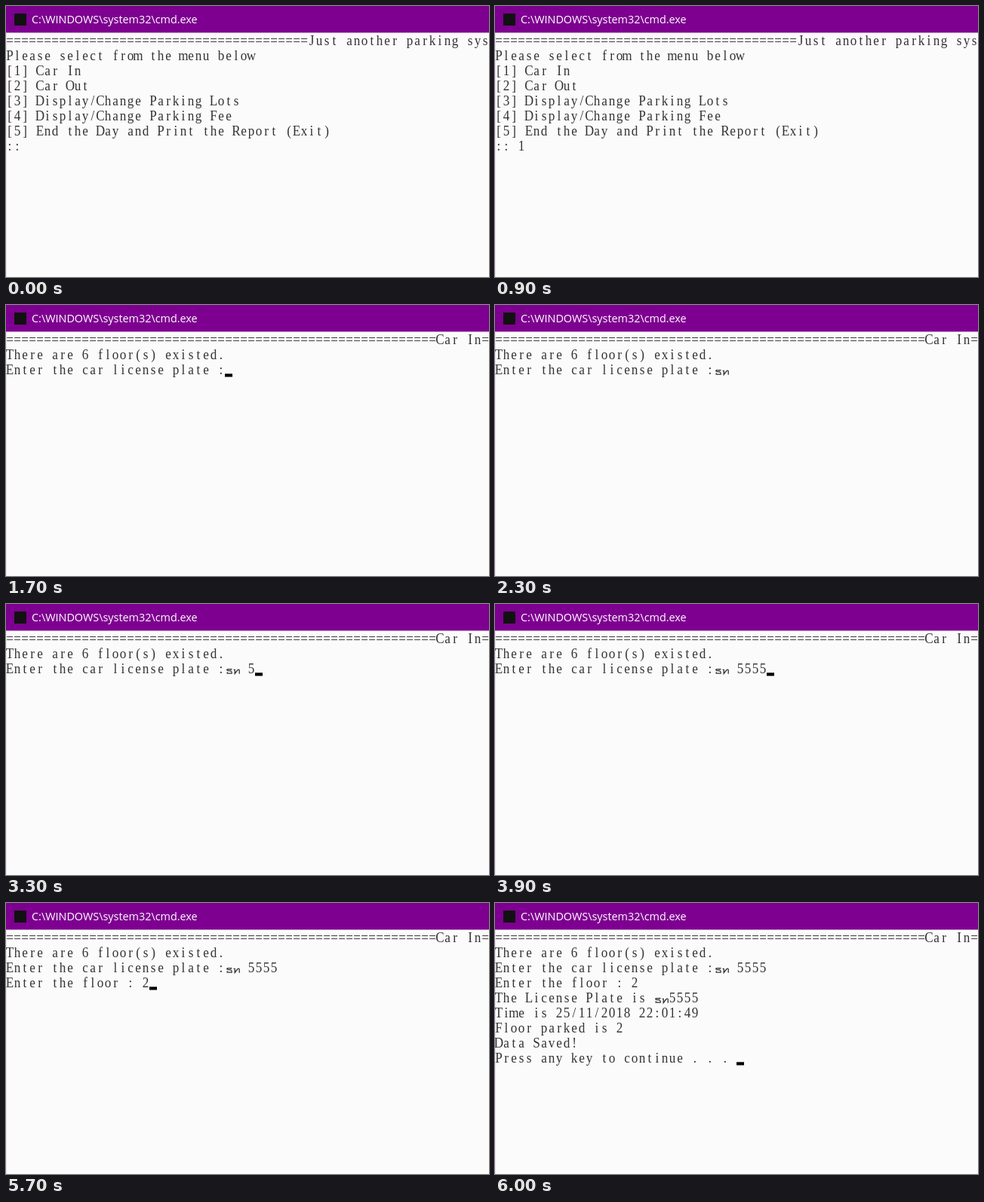
Write an HTML page with a canvas that moves like this. It is 640 by 360 pixels and loops after 6.2 s.

```html
<!DOCTYPE html>
<html lang="en">
<head>
<meta charset="utf-8">
<title>Parking console</title>
<style>
  html, body { margin: 0; width: 100%; height: 100%; overflow: hidden; background: #fbfbfb; }
  canvas { display: block; }
</style>
</head>
<body>
<canvas id="stage" width="640" height="360"></canvas>
<script>
const ctx = document.getElementById('stage').getContext('2d');
const LOOP = 6200, CELL = 10, ROW = 20, TOP = 36, CONDENSE = 0.9;
const INK = '#333';

const MENU = [
  '='.repeat(40) + 'Just another parking system',
  'Please select from the menu below',
  '[1] Car In',
  '[2] Car Out',
  '[3] Display/Change Parking Lots',
  '[4] Display/Change Parking Fee',
  '[5] End the Day and Print the Report (Exit)',
  ':: '
];
const PLATE = [
  '='.repeat(57) + 'Car In' + '='.repeat(5),
  'There are 6 floor(s) existed.',
  'Enter the car license plate :'
];
const FLOOR = [...PLATE.slice(0, 2), PLATE[2] + 'ธท 5555', 'Enter the floor : '];
const DONE = [
  ...FLOOR.slice(0, 3),
  FLOOR[3] + '2',
  'The License Plate is ธท5555',
  'Time is 25/11/2018 22:01:49',
  'Floor parked is 2',
  'Data Saved!',
  'Press any key to continue . . . '
];

// start time, screen, typed text, cursor shown
const STEPS = [
  [0, MENU, '', 0],
  [500, MENU, '1', 0],
  [1000, PLATE, '', 1],
  [1100, PLATE, '', 0],
  [1700, PLATE, '', 1],
  [1800, PLATE, 'ธ', 1],
  [2100, PLATE, 'ธท', 1],
  [2300, PLATE, 'ธท', 0],
  [2800, PLATE, 'ธท', 1],
  [3000, PLATE, 'ธท ', 1],
  [3300, PLATE, 'ธท 5', 1],
  [3400, PLATE, 'ธท 5', 0],
  [3600, PLATE, 'ธท 55', 0],
  [3700, PLATE, 'ธท 555', 0],
  [3800, PLATE, 'ธท 555', 1],
  [3900, PLATE, 'ธท 5555', 1],
  [4400, PLATE, 'ธท 5555', 0],
  [4500, FLOOR, '', 0],
  [4800, FLOOR, '', 1],
  [5200, FLOOR, '2', 1],
  [5300, FLOOR, '2', 0],
  [5700, FLOOR, '2', 1],
  [5900, DONE, '', 0],
  [6000, DONE, '', 1]
];

// Thai letters as strokes, since no Thai font is available
const THAI = {
  'ธ': new Path2D('M9.4 .8C7 2 5 .5 3.2 1.3C2 2.2 3.4 3.3 5.4 3.1C8.4 2.9 9.4 4.3 9.2 6.6H3.2V4.8'),
  'ท': new Path2D('M1.6 1.8H3.2V7L7 2Q9.2 .8 9.2 2.8V7.2')
};

function rect(x, y, w, h, color) {
  ctx.fillStyle = color;
  ctx.fillRect(x, y, w, h);
}

function drawChar(ch, col, row) {
  const x = col * CELL, y = TOP + row * ROW;
  ctx.save();
  if (THAI[ch]) {
    ctx.translate(x, y + 9.5);
    ctx.stroke(THAI[ch]);
  } else {
    ctx.translate(x + CELL / 2, y + 16);
    ctx.scale(CONDENSE, 1);
    ctx.fillText(ch, 0, 0);
  }
  ctx.restore();
}

function drawWindow() {
  rect(0, 0, 640, 360, '#fbfbfb');
  rect(0, 36, 1, 324, '#f0dff5');
  rect(0, 0, 640, 35, '#7e0090');
  rect(0, 35, 640, 1, '#c48fcb');
  rect(11, 10, 16, 16, '#111');
  ctx.fillStyle = '#fff';
  ctx.textAlign = 'left';
  ctx.font = '14.4px "Open Sans", "Noto Sans", sans-serif';
  ctx.fillText('C:\\WINDOWS\\system32\\cmd.exe', 34, 22.5);
}

function drawScreen([, lines, typed, cursor]) {
  drawWindow();
  ctx.fillStyle = ctx.strokeStyle = INK;
  ctx.lineWidth = 1.3;
  ctx.textAlign = 'center';
  ctx.font = '19px "Liberation Serif", "Noto Serif", serif';
  const last = lines.length - 1;
  lines.forEach((line, row) => {
    const text = row === last ? line + typed : line;
    [...text].forEach((ch, col) => drawChar(ch, col, row));
  });
  if (cursor) {
    const col = lines[last].length + typed.length;
    rect(col * CELL, TOP + last * ROW + 15.3, CELL, 4.2, '#000');
  }
}

let shown;
function tick() {
  const t = performance.now() % LOOP;
  const step = STEPS.findLast(s => s[0] <= t);
  if (step !== shown) drawScreen(shown = step);
  requestAnimationFrame(tick);
}
tick();
</script>
</body>
</html>
```
